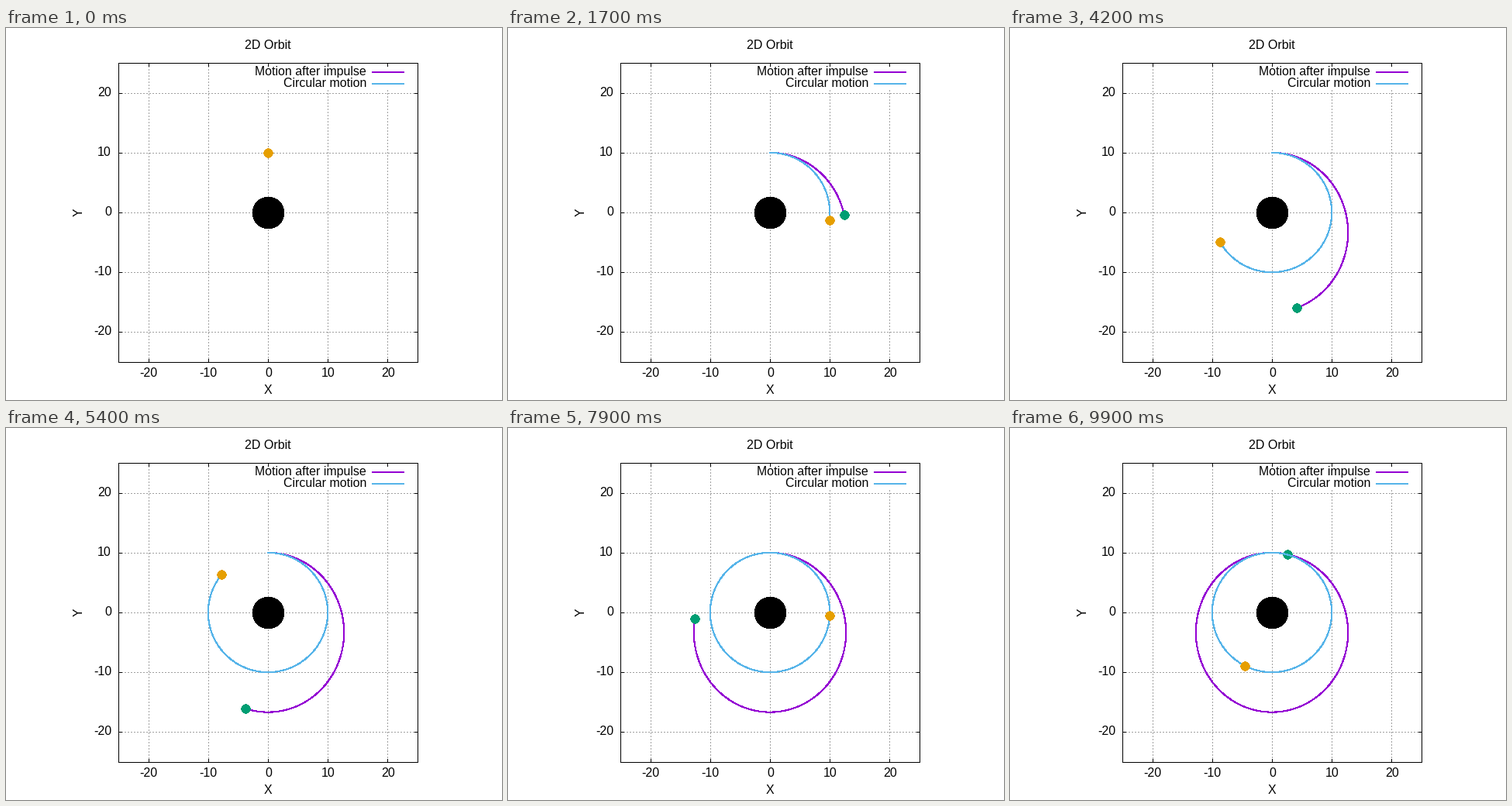
Animation, 640 px wide and 480 px high, one loop 10 s. Source, as a matplotlib script:

```python
import numpy as np
import matplotlib.pyplot as plt
from matplotlib.animation import FuncAnimation
from matplotlib.patches import Circle

W, H, DPI = 640, 480, 100
FRAMES, INTERVAL = 100, 100
PX = 72 / DPI                        # one pixel in points
LEFT, RIGHT, TOP, BOTTOM = 145, 531, 45, 431
CX, CY, SCALE = 338, 238, 7.72
PURPLE, GREEN, BLUE, ORANGE = "#9400d3", "#009e73", "#56b4e9", "#e69f00"

# Without antialiasing every touched pixel is filled, so sizes stay a bit small.
THIN, THICK = 0.8, 1.1

plt.rcParams.update({
    "font.family": "Liberation Sans",
    "font.size": 16 * PX,
    "text.hinting": "default",
    "text.hinting_factor": 8,
    "path.simplify": False,
    "lines.scale_dashes": False,
})

fig = plt.figure(figsize=(W / DPI, H / DPI), dpi=DPI, facecolor="white")
ax = fig.add_axes([0, 0, 1, 1])
ax.set(xlim=(0, W), ylim=(H, 0))
ax.axis("off")


def to_px(x, y):
    return CX + SCALE * x, CY - SCALE * y


def stroke(xs, ys, color, width, z, **kw):
    return ax.plot(xs, ys, color=color, lw=width * PX, zorder=z, antialiased=False,
                   snap=False, solid_capstyle="butt", solid_joinstyle="round", **kw)[0]


def hline(x0, x1, y, color="black", z=2, **kw):
    stroke([x0 + .1, x1 + .9], [y + .5, y + .5], color, THIN, z, **kw)


def vline(x, y0, y1, color="black", z=2, **kw):
    stroke([x + .5, x + .5], [y0 + .1, y1 + .9], color, THIN, z, **kw)


def disc(x, y, r, color, z):
    return ax.add_patch(Circle((x + .5, y + .5), r, fc=color, ec="none", lw=0,
                               antialiased=False, zorder=z))


def label(x, y, s, ha="center", **kw):
    ax.text(x, y, s, ha=ha, va="baseline", **kw)


def draw_axes():
    dots = dict(color="#a0a0a0", z=1, dash_capstyle="butt",
                linestyle=(0, (1.8 * PX, 2.2 * PX)))
    for v in range(-20, 21, 10):
        x, y = np.rint(to_px(v, v))
        vline(x, TOP if v < 0 else 80, BOTTOM, **dots)
        hline(LEFT, RIGHT, y, **dots)
        vline(x, TOP, TOP + 4)
        vline(x, BOTTOM - 4, BOTTOM)
        hline(LEFT, LEFT + 4, y)
        hline(RIGHT - 4, RIGHT, y)
        label(x + (1 if v >= 0 else -.5), 450, str(v))
        label(136, y + 4, str(v), ha="right")
    for y in (TOP, BOTTOM):
        hline(LEFT, RIGHT, y)
    for x in (LEFT, RIGHT):
        vline(x, TOP, BOTTOM)

    label(CX, 27, "2D Orbit")
    label(CX - .5, 472, "X")
    label(99, CY - .5, "Y", rotation=90, rotation_mode="anchor")
    for y, name, color in ((57, "Motion after impulse", PURPLE),
                           (72, "Circular motion", BLUE)):
        label(465, y + 4, name, ha="right")
        stroke([472, 514], [y, y], color, THICK, 2)


def circular(t):
    return to_px(10 * np.sin(t), 10 * np.cos(t))


def boosted(t):
    """Ellipse with its near point at the top, timed by Kepler's equation."""
    a, b, e = 40 / 3, 12.72, 0.25
    m = t / 1.5385
    E = m + e * np.sin(m)
    for _ in range(6):
        E -= (E - e * np.sin(E) - m) / (1 - e * np.cos(E))
    return to_px(b * np.sin(E), a * (np.cos(E) - e))


draw_axes()
disc(CX, CY, 20.2, "black", 3)

times = np.arange(FRAMES) * 0.1
bodies = []
for path, line_color, dot_color, z in ((boosted, PURPLE, GREEN, 4),
                                       (circular, BLUE, ORANGE, 6)):
    xs, ys = path(times)
    trail = stroke([], [], line_color, THICK, z)
    bodies.append((xs, ys, trail, disc(CX, CY, 5.6, dot_color, z + 1)))


def update(i):
    for xs, ys, trail, dot in bodies:
        trail.set_data(xs[:i + 1], ys[:i + 1])
        dot.center = np.rint(xs[i]) + .5, np.rint(ys[i]) + .5
    return [artist for body in bodies for artist in body[2:]]


anim = FuncAnimation(fig, update, frames=FRAMES, interval=INTERVAL,
                     repeat=True, repeat_delay=0)
plt.show()
```
